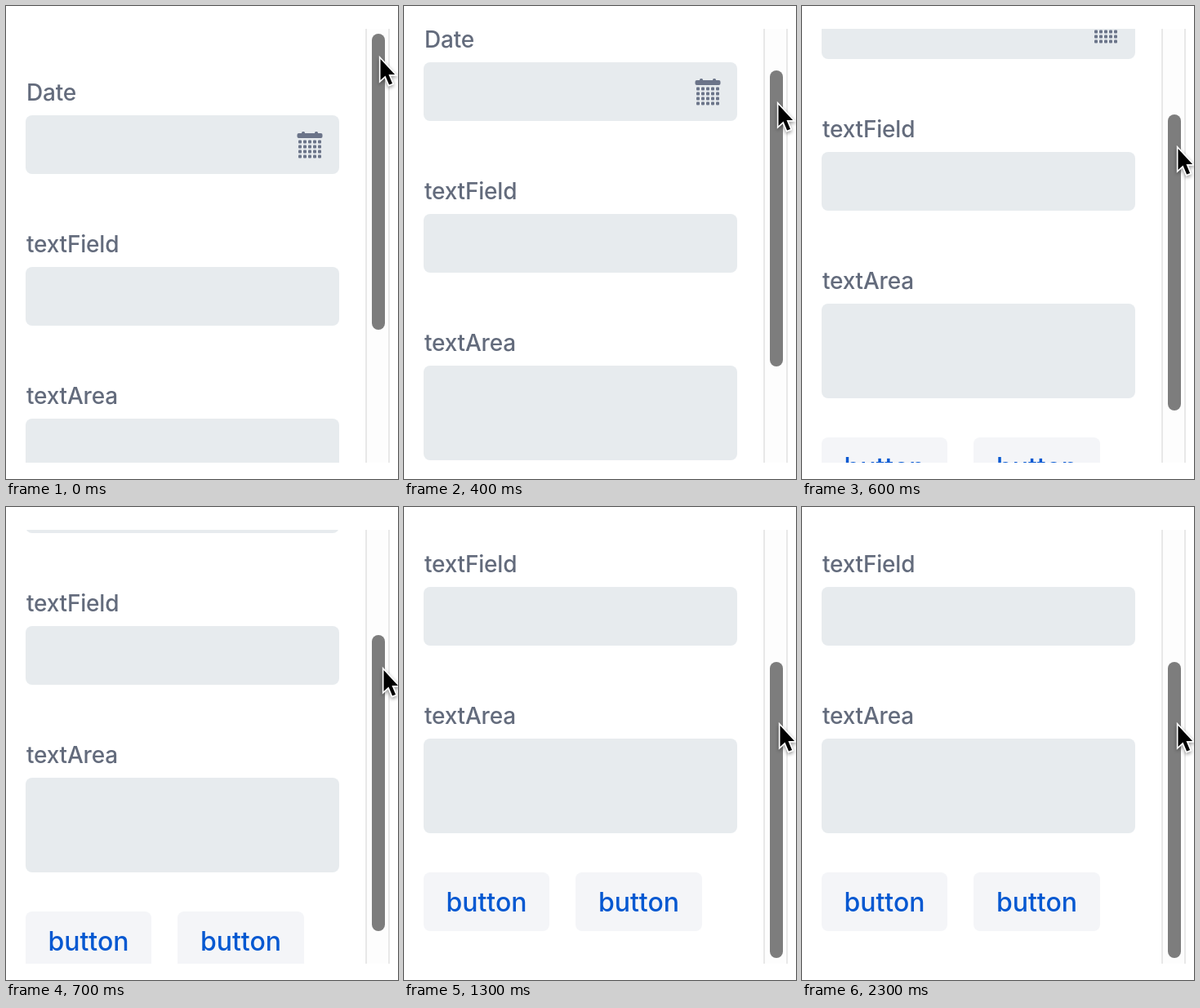
These frames come from a looping animation (480x580 px, 2.5 s). An HTML page with a canvas:

```html
<!DOCTYPE html>
<html lang="en">
<head>
<meta charset="utf-8">
<title>Scrolling form</title>
<style>
  html, body { margin: 0; width: 100%; height: 100%; overflow: hidden; background: #fff; }
  canvas { display: block; width: 480px; height: 580px; }
</style>
</head>
<body>
<canvas id="stage" width="480" height="580"></canvas>
<script>
const ctx = document.getElementById('stage').getContext('2d');
const LOOP = 2500, STEP = 100;
const TOP = 28, BOTTOM = 560;
const THUMB_TOP = 34, THUMB_HEIGHT = 363;

// One pose per 100 ms while dragging; the last one holds until the loop ends.
const scroll  = [0, 6, 17, 38, 65, 105, 141, 174, 198, 213, 222, 222, 222];
const thumb   = [0, 4, 11, 26, 45, 74, 99, 123, 139, 150, 156, 156, 156];
const pointY  = [62, 68, 78, 96, 118, 145, 172, 197, 217, 233, 247, 258, 265];
const pointX  = [457, 457, 457, 457, 457, 457, 459, 461, 461, 461, 460, 460, 459];

function box(x, y, w, h, r, color) {
  ctx.fillStyle = color;
  ctx.beginPath();
  ctx.roundRect(x, y, w, h, r);
  ctx.fill();
}

function label(text, y) {
  ctx.font = '500 28px Inter, sans-serif';
  ctx.letterSpacing = '-0.2px';
  ctx.textAlign = 'left';
  ctx.fillStyle = '#636b7c';
  ctx.fillText(text, 25, y);
}

function field(name, y, height) {
  label(name, y - 18);
  box(24, y, 384, height, 8, '#e7ebee');
}

function button(x, y, width) {
  box(x, y, width, 72, 8, '#f4f5f8');
  ctx.font = '500 32px Inter, sans-serif';
  ctx.letterSpacing = '0px';
  ctx.textAlign = 'center';
  ctx.fillStyle = '#0558d1';
  ctx.fillText('button', x + width / 2, y + 48);
}

function calendar(x, y) {
  const color = '#6b7489';
  box(x, y + 2, 31, 6, 2, color);
  box(x + 5.5, y, 4, 4, 1.5, color);
  box(x + 21.5, y, 4, 4, 1.5, color);
  for (let row = 0; row < 4; row++) {
    for (let col = 0; col < 5; col++) {
      box(x + 1.5 + col * 6, y + 10.5 + row * 6, 4, 4, 1, color);
    }
  }
}

function form(offset) {
  ctx.save();
  ctx.beginPath();
  ctx.rect(0, TOP, 440, BOTTOM - TOP);
  ctx.clip();
  ctx.translate(0, -offset);
  field('Date', 134, 72);
  calendar(356.5, 154);
  field('textField', 320, 72);
  field('textArea', 506, 116);
  button(24, 670, 154);
  button(210, 670, 155);
  ctx.restore();
}

function scrollbar(offset) {
  const height = BOTTOM - TOP;
  box(440, TOP, 30, height, 0, '#e8e8e8');
  box(442, TOP, 26, height, 0, '#fdfdfd');
  box(448, THUMB_TOP + offset, 16, THUMB_HEIGHT, 8, '#7d7d7d');
}

function pointer(x, y) {
  const arrow = new Path2D('M0 0V26L6 20.6L10.6 31.6L14.6 30L10 19H17.6Z');
  ctx.save();
  ctx.translate(x + 1.5, y + 3);
  ctx.lineWidth = 3.4;
  ctx.lineJoin = 'miter';
  ctx.strokeStyle = '#fff';
  ctx.shadowColor = 'rgba(0, 0, 0, 0.4)';
  ctx.shadowBlur = 4;
  ctx.shadowOffsetY = 2;
  ctx.stroke(arrow);
  ctx.shadowColor = 'transparent';
  ctx.fillStyle = '#000';
  ctx.fill(arrow);
  ctx.restore();
}

function draw() {
  const time = performance.now() % LOOP;
  const pose = Math.min(Math.floor(time / STEP), scroll.length - 1);
  ctx.fillStyle = '#fff';
  ctx.fillRect(0, 0, 480, 580);
  form(scroll[pose]);
  scrollbar(thumb[pose]);
  pointer(pointX[pose], pointY[pose]);
  requestAnimationFrame(draw);
}

draw();
</script>
</body>
</html>
```
